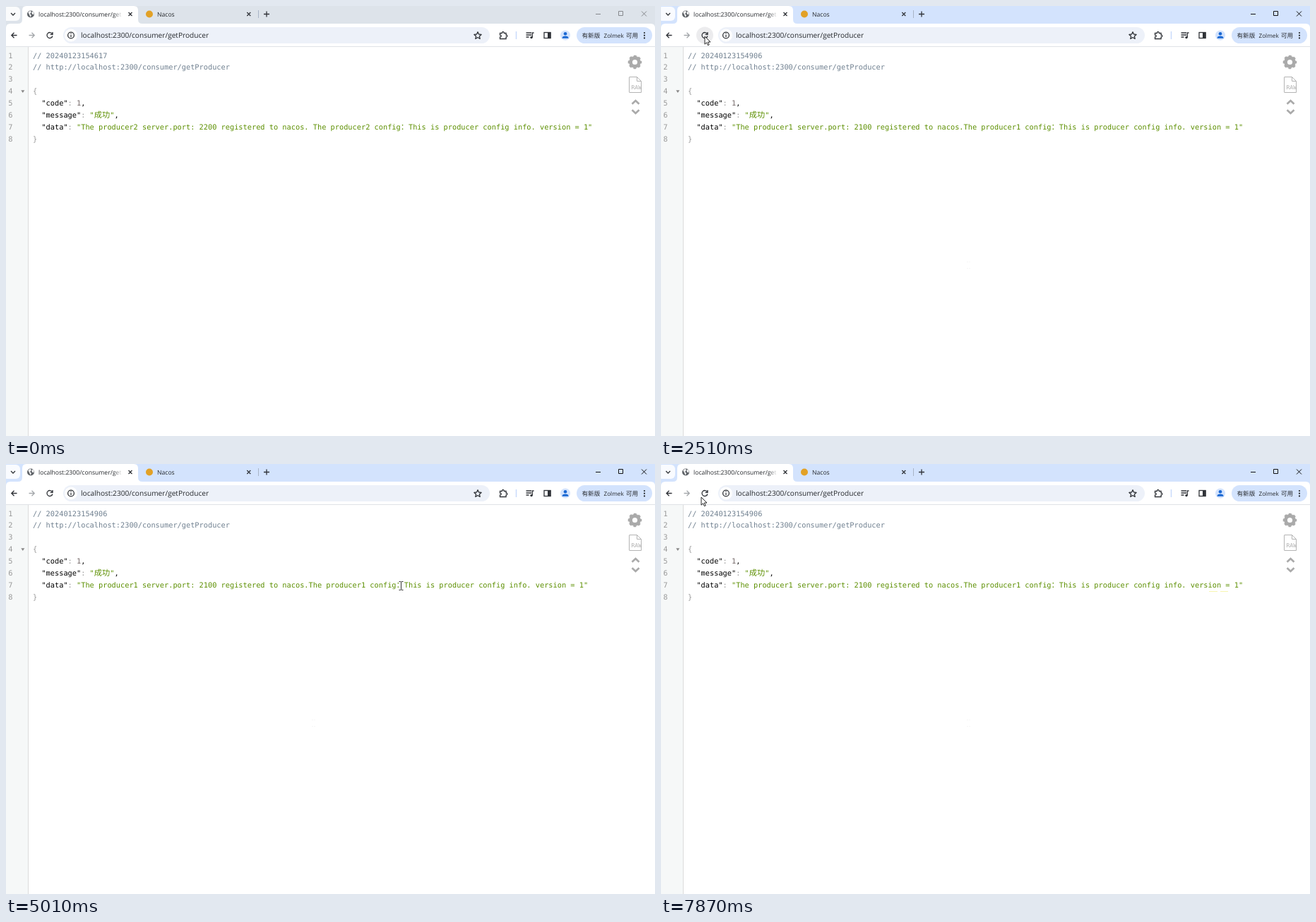
An HTML page for the animation above (8 s loop, 919 px wide and 609 px high).

```html
<!DOCTYPE html>
<html lang="zh-CN">
<head>
<meta charset="utf-8">
<title>JSON response</title>
<style>
html, body { margin: 0; width: 100%; height: 100%; overflow: hidden; background: #fff; }
svg { display: block; text-rendering: geometricPrecision; }
text { white-space: pre; }
.ui { font-family: "Open Sans", "Noto Sans", sans-serif; fill: #25282c; }
.cjk { font-family: "Noto Sans CJK SC", "Noto Sans CJK", "Noto Sans CJK JP", sans-serif; }
.code { font: 10.3px "DejaVu Sans Mono", monospace; }
.code .cjk { font-size: 11.2px; }
.raw { font: 8px "DejaVu Sans Mono", monospace; fill: #b0b0b0; }
.note { fill: #708090; } .key { fill: #000; } .str { fill: #5c8f00; }
.num { fill: #776b6b; } .mark { fill: #999; }
.line { fill: none; stroke: #303338; stroke-width: 1.3; }
</style>
</head>
<body>
<svg width="919" height="609" viewBox="0 0 919 609">
  <!-- tab strip -->
  <rect id="strip" width="919" height="40"/>
  <rect x="-4" y="1" width="24" height="20" rx="6" fill="#fff" fill-opacity=".85"/>
  <path class="line" d="M7 10l3 3 3-3"/>
  <path d="M0 58V31q0-6 6-6h11q6 0 6-6V6q0-6 6-6H181q6 0 6 6V19q0 6 6 6H913q6 0 6 6V58z" fill="#fff"/>
  <g id="favicon">
    <circle cx="35" cy="11.500" r="5" fill="#5f6368"/>
    <path d="M31.500 9l3-2 1 2-2 2 2 2-1 2.500M37 8l2 1v3l-2-1z" fill="#fff" stroke="#fff" stroke-width=".6"/>
  </g>
  <text class="ui" x="46" y="14.800" font-size="8.650">localhost:2300/consumer/get</text>
  <rect x="152" y="4" width="16" height="16" fill="url(#fade)"/>
  <circle cx="203" cy="11.500" r="5" fill="#e2a126"/>
  <text class="ui" x="214" y="14.800" font-size="8.650">Nacos</text>
  <path class="line" d="M173.500 9l5 5m0-5l-5 5M341.300 9l5 5m0-5l-5 5M365 11.500h8m-4-4v8"/>
  <path d="M357.500 6v11" stroke="#a9b4c6"/>
  <path id="controls" d="M835 11.500h7M867.500 7.500h6v6h-6zM900 7.500l7 7m0-7l-7 7" fill="none"/>

  <!-- toolbar -->
  <circle id="hover" cx="62" cy="41.500" r="12" fill="#ececee"/>
  <path class="line" d="M15.500 41.500H8m3.500-3.700L7.800 41.500l3.700 3.700"/>
  <path class="line" style="stroke:#a5a8ac" d="M32.500 41.500H40m-3.500-3.700l3.700 3.700-3.700 3.700"/>
  <path class="line" d="M65.500 39.500a4 4 0 1 0 .4 3M66 37v3.300h-3.300"/>
  <rect x="81" y="30" width="604" height="23" rx="11.500" fill="#edf1f9"/>
  <circle cx="92" cy="41.500" r="9" fill="#fff"/>
  <circle class="line" cx="92" cy="41.500" r="4.400"/>
  <path class="line" d="M92 41v3M92 38.600v1.200"/>
  <text class="ui" x="106" y="45.100" font-size="10.150">localhost:2300/consumer/getProducer</text>
  <path class="line" d="M668 36.700l1.500 3.300 3.600.4-2.700 2.400.8 3.600-3.200-1.900-3.200 1.900.8-3.600-2.700-2.400 3.600-.4z" stroke-linejoin="round"/>
  <path class="line" d="M699.500 38.500h2.800q0-2 1.500-2t1.500 2h2.800v2.500q1.700 0 1.700 1.500t-1.700 1.500v2.500h-8.600v-2.600q1.800 0 1.800-1.400t-1.800-1.400z"/>
  <path d="M722.500 36v11" stroke="#c9dbfb" stroke-width="1.500"/>
  <path class="line" d="M736.500 38h7.500M736.500 41h7.500M736.500 44h4M745.300 44.500V38h2.200"/>
  <circle cx="744" cy="44.600" r="1.700" fill="#303338"/>
  <rect class="line" x="762" y="37.500" width="9" height="8"/>
  <rect x="767" y="37" width="4.500" height="9" fill="#303338"/>
  <circle cx="792" cy="41.500" r="7" fill="#d3e3fd"/>
  <circle cx="792" cy="39.300" r="2.300" fill="#1967d2"/>
  <path d="M787.500 45.800q0-3.300 4.500-3.300t4.500 3.300z" fill="#1967d2"/>
  <rect x="808" y="30" width="107" height="23" rx="11.500" fill="#d3e3fd"/>
  <g class="ui" font-size="8.600">
    <text class="cjk" x="815.500" y="45">有新版</text>
    <text x="846.500" y="45" font-size="8.200">Zolmek</text>
    <text class="cjk" x="878" y="45">可用</text>
  </g>
  <g fill="#25282c"><circle cx="904" cy="38" r="1.100"/><circle cx="904" cy="41.700" r="1.100"/><circle cx="904" cy="45.400" r="1.100"/></g>
  <path d="M0 57.500H919" stroke="#dfe2e6"/>

  <!-- page -->
  <g id="page">
    <rect y="58" width="31" height="551" fill="#f6f8f8"/>
    <path d="M31.500 58V609" stroke="#dcdcdc"/>
    <rect id="selection" y="163" height="16.500" fill="#d7d4f0"/>
    <g id="rows" class="code"></g>
    <path id="fold" d="M21.300 119.300h5l-2.500 3.700z" fill="#888"/>
    <g fill="none" stroke="#aaa">
      <circle cx="890.500" cy="79.500" r="6" stroke-width="4.800"/>
      <circle cx="890.500" cy="79.500" r="8.500" stroke-width="2.600" stroke-dasharray="3.700 2.976" stroke-dashoffset="1.850"/>
      <path d="M883 100.500h10.500l6 6V122.500H883q-.5 0-.5-.5V101q0-.5.500-.5zM893.500 100.500v6h6" stroke="#b4b4b4"/>
      <path d="M886.500 138.700l5-4.700 5 4.700M886.500 147.300l5 4.700 5-4.700" stroke-width="2.700"/>
    </g>
    <text class="raw" x="885.500" y="118">RAW</text>
  </g>
  <path id="trace" d="M433 362.500h2m1 0h2M433 371.500h2m1 0h2" stroke="#f6f6f6"/>
  <path id="smear" d="M776 180.500h12m4 0h11" stroke="#f7f5b0"/>

  <path id="beam" d="M-3-6h2l1 .5 1-.5h2M-3 6h2l1-.5 1 .5h2M0-5.500v11" fill="none" stroke="#333"/>
  <circle id="press" r="6.500" fill="#fbf23c" fill-opacity=".9" style="mix-blend-mode:multiply"/>
  <path id="arrow" d="M0 0V11.200l2.600-2.500 1.800 4 1.800-.8-1.800-3.900H8z" fill="#fff" stroke="#111" stroke-width=".9"/>
  <defs><linearGradient id="fade"><stop stop-color="#fff" stop-opacity="0"/><stop offset=".8" stop-color="#fff"/></linearGradient></defs>
</svg>
<script>
const $ = id => document.getElementById(id);
const CHAR = 6.2, LOOP = 8000;

const linear = p => p;
const smooth = p => p * p * (3 - 2 * p);
const easeOut = power => p => 1 - (1 - p) ** power;

// Pointer moves: start, end, number of steps, easing, waypoints
const moves = [
  [250, 1030, 12, smooth, [[803, 583], [435, 366], [85.5, 63]]],
  [1100, 1380, 5, easeOut(2), [[85.5, 63], [62, 43]]],
  [3170, 3920, 11, linear, [[62, 43], [150, 120], [238, 177], [252, 180]]],
  [4000, 4140, 3, easeOut(4), [[252, 180], [297, 176.5]]],
  [4400, 5150, 10, smooth, [[297, 176.5], [590, 172]]],
  [5220, 5500, 5, easeOut(2), [[590, 172], [718.5, 172]]],
  [5770, 6540, 12, easeOut(2.2), [[718.5, 172], [810, 177]]],
  [6610, 7380, 12, smooth, [[810, 177], [366, 152], [49.5, 71.5]]],
  [7450, 7870, 7, linear, [[49.5, 71.5], [46.5, 64], [57, 47]]],
];
// Text drags: press time, release time, left edge, time the selection is cleared
const drags = [[3780, 4400, 236.6, 4400], [5770, 6540, 718.8, 6610]];

function along(points, p) {
  const s = p * (points.length - 1), i = Math.min(Math.floor(s), points.length - 2);
  return [0, 1].map(a => points[i][a] + (points[i + 1][a] - points[i][a]) * (s - i));
}

// lag = how many steps behind the pointer
function pointer(t, lag = 0) {
  const move = moves.filter(m => m[0] <= t).pop();
  if (!move) return null;
  const [from, to, steps, ease, points] = move;
  const step = Math.min(steps, 1 + Math.floor((t - from) / (to - from) * (steps - 1) + 0.2));
  return along(points, ease(Math.max(0, step - lag) / steps));
}

const span = (cls, text) => `<tspan class="${cls}">${text}</tspan>`;
const cjk = text => span('cjk', text);
const pair = (key, cls, value, end = '') =>
  span('key', `"${key}"`) + span('mark', ': ') + span(cls, value) + span('key', end);

function rows(stamp, message) {
  return [
    [38, span('note', '// ' + stamp)],
    [38, span('note', '// http://localhost:2300/consumer/getProducer')],
    [38, ''],
    [38, span('mark', '{')],
    [50.4, pair('code', 'num', '1', ',')],
    [50.4, pair('message', 'str', `"${cjk('成功')}"`, ',')],
    [50.4, pair('data', 'str', `"${message}${cjk('：')}This is producer config info. version = 1"`)],
    [38, span('mark', '}')],
  ].map(([x, body], i) => {
    const y = 73.5 + 16.86 * i;
    return `<text class="mark" x="3.300" y="${y}">${i + 1}</text><text x="${x}" y="${y}">${body}</text>`;
  }).join('');
}
const before = rows('20240123154617', 'The producer2 server.port: 2200 registered to nacos. The producer2 config');
const after = rows('20240123154906', 'The producer1 server.port: 2100 registered to nacos.The producer1 config');

const show = (id, on) => $(id).style.display = on ? '' : 'none';
const place = (id, [x, y]) => $(id).setAttribute('transform', `translate(${x} ${y})`);
const snap = v => Math.floor(v) + 0.5;
let content;

function draw(t) {
  const focused = t >= 1710, loading = t >= 1970 && t < 2110;
  $('strip').setAttribute('fill', focused ? '#d3e3fd' : '#dde3ea');
  $('controls').setAttribute('stroke', focused ? '#111' : '#85888c');
  const next = t < 1970 ? before : after;
  if (next !== content) $('rows').innerHTML = content = next;
  show('page', !loading);
  show('favicon', !loading);
  show('fold', t < 1970 || t >= 2510);
  show('hover', t >= 1240 && t < 3170);
  show('trace', t >= 700);
  show('smear', t >= 6610);

  const pos = pointer(t);
  const onPage = pos && pos[1] > 57;
  show('beam', onPage);
  show('arrow', pos && !onPage);
  if (pos) {
    place('beam', pos.map(snap));
    place('arrow', pos);
    place('press', pos);
  }
  show('press', drags.some(([down, up]) => t >= down && t < up));

  const drag = drags.find(([down, , , clear]) => t >= down && t < clear);
  let width = 0;
  if (drag) {
    width = Math.max(0, Math.round((pointer(t, 1)[0] - drag[2]) / CHAR)) * CHAR;
    $('selection').setAttribute('x', drag[2]);
  }
  $('selection').setAttribute('width', width);
}

const start = performance.now();
function frame() {
  draw((performance.now() - start) % LOOP);
  requestAnimationFrame(frame);
}
frame();
</script>
</body>
</html>
```
